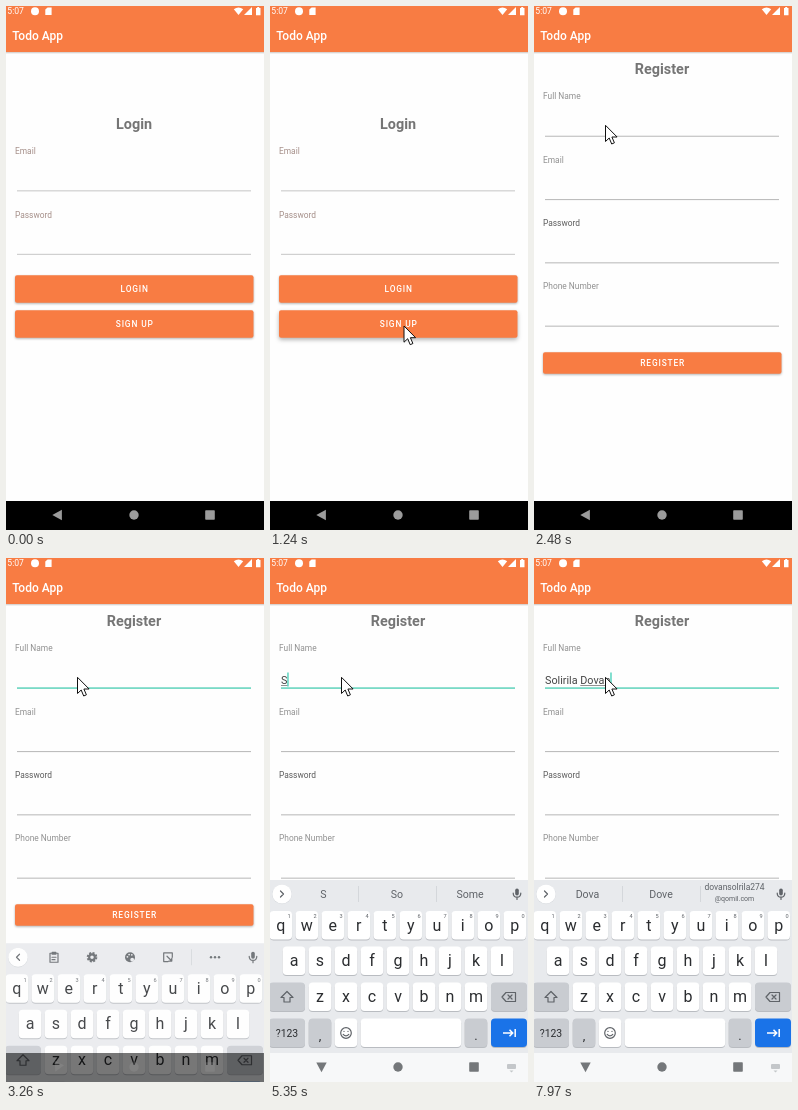
These frames come from a looping animation (258x524 px, 8 s). An HTML page:

```html
<!DOCTYPE html>
<html lang="en">
<head>
<meta charset="utf-8">
<title>Todo App sign up</title>
<style>
html, body { margin: 0; width: 100%; height: 100%; overflow: hidden; background: #000; }
svg { display: block; width: 100%; height: 100%; font-family: Roboto, sans-serif; }
text { white-space: pre; }
.line { fill: none; stroke: #5f6368; stroke-width: 1.2; stroke-linejoin: round; stroke-linecap: round; }
</style>
</head>
<body>
<svg id="stage" viewBox="0 0 258 524"></svg>
<script>
const LOOP = 8000;
const ORANGE = '#f87c43';
const stage = document.getElementById('stage');
const $ = id => document.getElementById(id);

// Markup helpers
const rect = (x, y, w, h, fill, r = 0, extra = '') =>
  `<rect x="${x}" y="${y}" width="${w}" height="${h}" rx="${r}" fill="${fill}" ${extra}/>`;
const text = (x, y, size, fill, s, extra = '') =>
  `<text x="${x}" y="${y}" font-size="${size}" fill="${fill}" ${extra}>${s}</text>`;
const mid = (x, y, size, fill, s, extra = '') => text(x, y, size, fill, s, 'text-anchor="middle" ' + extra);
const at = (x, y, inner) => `<g transform="translate(${x} ${y})">${inner}</g>`;
const line = d => `<path class="line" d="${d}"/>`;
const solid = (d, fill = '#5f6368') => `<path d="${d}" fill="${fill}"/>`;
const dot = (x, y, r, fill) => `<circle cx="${x}" cy="${y}" r="${r}" fill="${fill}"/>`;

const button = (y, h, label, id) =>
  rect(9, y, 238.5, h, ORANGE, 2, `id="${id}" style="filter:drop-shadow(0 1px 1px rgba(0,0,0,.3))"`) +
  mid(128.7, y + h / 2 + 3, 8.4, '#fff', label, 'font-weight="500" letter-spacing=".85"');
const field = (label, y, color, stroke) =>
  text(9, y, 8.4, color, label) + rect(11, y + 36.3, 234, 1.1, stroke);
const heading = (y, s) => mid(128, y, 14.4, '#757575', s, 'font-weight="700"');

const frame = body =>
  rect(0, 0, 258, 495, '#fefefe') +
  rect(0, 46, 258, 1, '#d9d4d2') + rect(0, 47, 258, 1, '#f1efee') +
  rect(0, 0, 258, 46, ORANGE) +
  text(6.3, 34, 12, '#fff', 'Todo App', 'font-weight="500"') +
  rect(0, 495, 258, 29, '#000') + body;

const login = frame(
  heading(122.8, 'Login') +
  field('Email', 148, '#a58f89', '#cbcbcb') +
  field('Password', 211.5, '#a58f89', '#cbcbcb') +
  button(269.3, 27.5, 'LOGIN', 'loginBtn') +
  button(304.2, 27.5, 'SIGN UP', 'signBtn'));

const register = frame(
  heading(67.8, 'Register') +
  field('Full Name', 93.4, '#919191', '#bdbdbd') +
  field('Email', 156.7, '#919191', '#bdbdbd') +
  field('Password', 220, '#5c5c5c', '#bdbdbd') +
  field('Phone Number', 283.3, '#919191', '#bdbdbd') +
  rect(11, 129.3, 234, 1.6, '#6fdcc6', 0, 'id="focus"') +
  text(11, 126, 10.8, '#444', '', 'id="entry"') +
  rect(11, 127, 0, .8, '#777', 0, 'id="under"') +
  rect(11, 114.5, 1.1, 14, '#1fc5a8', 0, 'id="caret"') +
  button(346.3, 21.5, 'REGISTER', 'regBtn'));

const status =
  text(1.3, 8.3, 8.6, '#fff', '5:07') +
  dot(29, 5.2, 4, '#fff') +
  solid('M39.3 3.5 41.6 1.4H45.6V9H39.3Z', '#fff') +
  solid('M227.8 3.2Q232.5-.4 237.2 3.2L232.5 9Z', '#fff') +
  solid('M246 1V9H238Z', '#fff') +
  solid('M250 2H251.2V1H253.2V2H254.5V9.3H250Z', '#fff');

// Keyboard icons, each centred on its own origin
const icons = {
  chevLeft: line('M1.5-3-1.5 0 1.5 3'),
  chevRight: line('M-1.5-3 1.5 0-1.5 3'),
  search: line('M2-1A3 3 0 1 1-4-1A3 3 0 1 1 2-1M1.3 1.3 4.5 4.5'),
  sticker: line('M-4.3-4.3H4.3V1.3L1.3 4.3H-4.3ZM4.3 1.3H1.3V4.3M-2-.2Q-.5 2.2 1.4.2M-1.8-2V-1.9M1.6-2V-1.9'),
  clip: line('M-4-4H4V5H-4ZM-1.8-5H1.8V-3H-1.8ZM-2 0H2M-2 2.4H1'),
  gear: `<circle r="4.3" fill="none" stroke="#5f6368" stroke-width="2" stroke-dasharray="2 1.38"/>` +
    `<circle r="2.8" fill="none" stroke="#5f6368" stroke-width="2.2"/>`,
  palette: dot(0, 0, 5, '#5f6368') + dot(-2.6, -.4, .9, '#e8eaed') + dot(-.9, -2.7, .9, '#e8eaed') +
    dot(1.8, -2.4, .9, '#e8eaed') + dot(2.2, 2.4, 1.9, '#e8eaed'),
  resize: line('M-4.3-4.3H4.3V0M0 4.3H-4.3V-4.3M-1-1 3.8 3.8M3.8 .8V3.8H.8'),
  more: [-4, 0, 4].map(x => dot(x, 0, 1.2, '#5f6368')).join(''),
  mic: rect(-1.8, -5.5, 3.6, 7, '#5f6368', 1.8) + line('M-3.8-1Q-3.8 3.2 0 3.2 3.8 3.2 3.8-1M0 3.2V5.5')
};
const icon = (name, x) => at(x, 336, icons[name]);
const divider = x => rect(x, 328, .8, 16, '#cfd2d6');

const WHITE = '#fff', GREY = '#c9ccd1', INK = '#2b2d30';
const keyBox = (x, y, w, fill, h = 28.6) =>
  rect(x, y + .8, w, h, '#b9bcc1', 4) + rect(x, y, w, h, fill, 4);
const keyRow = (letters, x0, y, digits) => [...letters].map((c, i) => {
  const x = x0 + 26 * i;
  return keyBox(x - 11.3, y, 22.6, WHITE) + mid(x, y + 19.6, 16, INK, c) +
    (digits ? mid(x + 8.2, y + 7.4, 5.6, '#5f6368', (i + 1) % 10) : '');
}).join('');

const keys =
  keyRow('qwertyuiop', 10.8, 353, true) +
  keyRow('asdfghjkl', 24, 388.5) +
  keyRow('zxcvbnm', 50, 424.5) +
  keyBox(-1, 424.5, 36, GREY) + at(17, 439, line('M0-5.5 6 .5H3V5H-3V.5H-6Z')) +
  keyBox(221, 424.5, 36, GREY) + at(239, 439, line('M-7 0-3-4.5H6.5V4.5H-3ZM-1-2 3 2M3-2-1 2')) +
  keyBox(-1, 460.5, 36, GREY) + mid(17, 478.5, 10.4, INK, '?123') +
  keyBox(38.7, 460.5, 22.6, GREY) + mid(50, 482, 13, INK, ',') +
  keyBox(64.7, 460.5, 22.6, WHITE) +
  at(76, 475, line('M5.3 0A5.3 5.3 0 1 1-5.3 0A5.3 5.3 0 1 1 5.3 0M-2.8 1.4Q0 4.4 2.8 1.4M-2-1.7V-1.5M2-1.7V-1.5')) +
  keyBox(90.7, 460.5, 100.5, WHITE) +
  keyBox(194.7, 460.5, 22.6, GREY) + mid(206, 482, 13, INK, '.') +
  keyBox(221, 460.5, 36, '#1a73e8') +
  at(239, 475, '<path d="M-6 0H3.5M.5-3.2 3.7 0 .5 3.2M6.2-4V4" fill="none" stroke="#fff" stroke-width="1.5"/>');

const suggestion = (i, x) => mid(x, 340, 10.6, '#5f6368', '', `id="sug${i}"`);

const keyboard =
  rect(0, 322, 258, 202, '#e8eaed') + keys +
  rect(0, 495, 258, 29, '#f7f8f9') +
  dot(12, 336.4, 9.8, '#d5d8dc') + dot(12, 336, 9.6, '#fff') + icon('mic', 247) +
  `<g id="toolsA">${icon('chevLeft', 12)}${icon('clip', 48)}${icon('gear', 86)}${icon('palette', 124)}` +
  `${icon('resize', 162)}${divider(185)}${icon('more', 209)}</g>` +
  `<g id="toolsB">${icon('chevLeft', 12)}${icon('search', 48)}${icon('sticker', 86)}` +
  mid(123.5, 339, 8.6, '#5f6368', 'GIF', 'font-weight="900" letter-spacing=".5"') +
  `${icon('clip', 162)}${divider(185)}${icon('more', 209)}</g>` +
  `<g id="strip">${icon('chevRight', 12)}${divider(88)}${divider(166)}` +
  suggestion(0, 53.5) + suggestion(1, 127) + suggestion(2, 200) +
  `<g id="mail">${mid(200.5, 332, 8.5, '#5f6368', 'dovansolrila274')}${mid(200.5, 343, 7, '#5f6368', '@qomil.com')}</g></g>`;

const nav =
  '<g id="nav"><path id="back" d="M-5.2 0 4.4-5.2V5.2Z"/><circle cx="128" cy="509" r="4.7"/>' +
  '<rect x="199.2" y="504.2" width="9.6" height="9.6" rx=".8"/></g>' +
  `<g id="imeIcon" fill="#c4c7ca">${rect(237, 506, 9, 5, '#c4c7ca', 1)}${solid('M239.5 512.5H243.5L241.5 514.5Z', '#c4c7ca')}</g>`;

stage.innerHTML =
  '<defs><clipPath id="reveal"><rect id="revealBox" width="258" height="524"/></clipPath></defs>' +
  `<g id="login">${login}</g>` +
  `<g id="registerClip" clip-path="url(#reveal)"><g id="register">${register}</g></g>` +
  `<g id="keyboard">${keyboard}</g>` +
  rect(0, 495, 258, 29, '#000', 0, 'id="dim"') + nav + status +
  '<path id="cursor" d="M0 0V16.2L3.7 12.7 6.2 18.7 8.9 17.5 6.4 11.7H11.6Z" fill="#fff" stroke="#111" stroke-width="1" stroke-linejoin="round"/>';

// Timeline
const FIRST = 'Solirila', LAST = 'Dovan';
const FULL = FIRST + ' ' + LAST;
const typed = [5040, 5730, 5810, 5960, 6040, 6200, 6350, 6430, 6660, 7360, 7670, 7740, 7820, 7970];
const hints = [
  [5270, 'S', 'So', 'Some'],
  [5880, 'Sol', 'Solo', 'Sold'],
  [6120, 'Soli', 'Solid', 'Sole'],
  [6270, 'Soliri', 'Solrila', ''],
  [6660, 'Solirila', 'Solrila', ''],
  [7040, 'is', 'and', 'the'],
  [7510, 'D', 'Do', 'Did'],
  [7890, 'Dova', 'Dove', '@']
];
const path = [
  [70, 233, 477], [300, 203, 405], [520, 150, 310], [640, 122, 291], [850, 134, 320],
  [1700, 134, 320], [2000, 100, 190], [2240, 75, 108], [2320, 72, 126], [2400, 71.5, 119.3]
];

const span = (t, a, b) => Math.min(1, Math.max(0, (t - a) / (b - a)));
const easeOut = x => 1 - (1 - x) ** 3;
const show = (id, on) => { $(id).style.display = on ? '' : 'none'; };
const set = (id, name, value) => $(id).setAttribute(name, value);
const move = (id, x, y, more = '') => set(id, 'transform', `translate(${x} ${y})${more}`);

function cursorAt(t) {
  const i = path.findIndex(p => p[0] > t);
  if (i < 0) return path[path.length - 1].slice(1);
  const a = path[Math.max(0, i - 1)], b = path[i];
  const k = span(t, a[0], b[0]);
  return [a[1] + (b[1] - a[1]) * k, a[2] + (b[2] - a[2]) * k];
}

function drawEntry(t) {
  const entry = $('entry');
  const count = typed.filter(x => x <= t).length;
  const widthOf = s => {
    entry.textContent = s;
    return s ? entry.getComputedTextLength() : 0;
  };
  const from = count > FIRST.length + 1 ? widthOf(FIRST + ' ') : 0;
  const word = count > FIRST.length + 1 ? 0 : widthOf(FIRST.slice(0, count));
  const width = widthOf(FULL.slice(0, count));
  const marked = t >= 5270 && (t < 7040 || from > 0);
  show('under', marked);
  set('under', 'x', 11 + from);
  set('under', 'width', from ? width - from : word);
  set('caret', 'x', 11 + width);
  show('caret', (t >= 3640 && t < 4200) || t >= 4660);
}

function drawKeyboard(t) {
  const p = easeOut(span(t, 3100, 3560));
  show('keyboard', t >= 3100);
  move('keyboard', 0, 202 * (1 - p) * 1.14);
  set('keyboard', 'opacity', .5 + .5 * p);
  set('dim', 'opacity', t < 3100 ? 0 : (1 - p) ** .6);
  set('nav', 'fill', p < 1 ? '#9b9b9b' : '#74777a');
  set('nav', 'opacity', 1 - .9 * Math.sin(Math.PI * p) ** .8);
  move('back', 51.5, 509, ` rotate(${-90 * p})`);
  show('imeIcon', p === 1);

  const hint = hints.filter(h => h[0] <= t).pop();
  show('toolsA', t < 3640);
  show('toolsB', t >= 3640 && !hint);
  show('strip', hint);
  if (hint) {
    const mail = hint[3] === '@';
    for (let i = 0; i < 3; i++) $('sug' + i).textContent = i === 2 && mail ? '' : hint[i + 1];
    show('mail', mail);
  }
}

function draw(t) {
  const lift = span(t, 950, 1240);
  $('signBtn').style.filter = `drop-shadow(0 ${1 + lift}px ${1 + lift}px rgba(0,0,0,.3))`;

  const open = easeOut(span(t, 1430, 1860));
  move('login', 0, -10.5 * open);
  show('login', open < 1);
  show('registerClip', open > 0);
  set('revealBox', 'y', 502 * (1 - open));
  move('register', 0, 21.5 * (1 - open));
  set('focus', 'opacity', span(t, 2540, 2630));

  drawEntry(t);
  drawKeyboard(t);

  show('cursor', t >= 70);
  move('cursor', ...cursorAt(t));
}

function tick() {
  draw(performance.now() % LOOP);
  requestAnimationFrame(tick);
}
tick();
</script>
</body>
</html>
```
